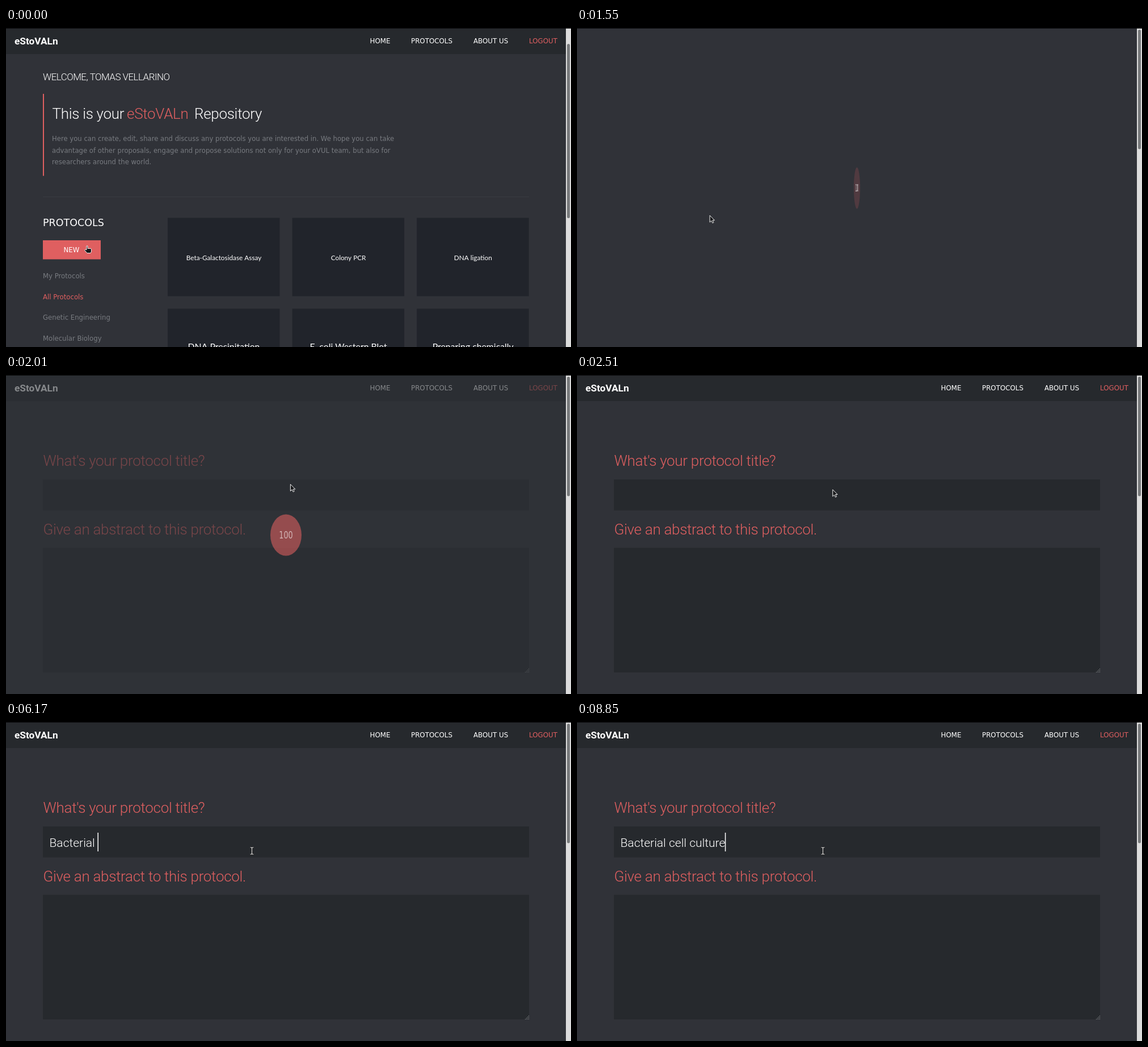
These frames come from a looping animation (996 by 562 pixels, 9710 ms). An HTML page with a canvas:

```html
<!DOCTYPE html>
<html lang="en">
<head>
<meta charset="utf-8">
<style>
  html, body { margin: 0; height: 100%; overflow: hidden; background: #303238; }
  canvas { display: block; }
</style>
</head>
<body>
<canvas id="stage" width="996" height="562"></canvas>
<script>
const ctx = document.getElementById('stage').getContext('2d');
const LOOP = 9710;
const BG = '#303238', DARK = '#26292d', CARD = '#21242b', RED = '#df5f60', GREY = '#787b80';
const UI = '"DejaVu Sans", sans-serif';
const LIGHT = 'Roboto, sans-serif';
const BRAND = 'eStoVALn';

// Time at which the title field takes each value
const typing = [
  [0, ''], [3810, 'B'], [4020, 'Ba'], [4170, 'Bac'], [4410, 'Bact'], [4510, 'Bacte'],
  [4610, 'Bacter'], [4710, 'Bacteri'], [4770, 'Bacteria'], [4920, 'Bacterial'],
  [5110, 'Bacterial '], [5680, 'Bacterial C'], [6170, 'Bacterial '], [6390, 'Bacterial c'],
  [6490, 'Bacterial ce'], [6680, 'Bacterial cel'], [6820, 'Bacterial cell'],
  [7000, 'Bacterial cell '], [7180, 'Bacterial cell C'], [8030, 'Bacterial cell '],
  [8070, 'Bacterial cell c'], [8220, 'Bacterial cell cu'], [8380, 'Bacterial cell cul'],
  [8470, 'Bacterial cell cult'], [8570, 'Bacterial cell cultu'],
  [8700, 'Bacterial cell cultur'], [8850, 'Bacterial cell culture']
];

// Pointer waypoints: time, x, y
const pointerPath = [
  [0, 142, 385], [1150, 144, 385], [1550, 233.5, 330.5], [2010, 501.5, 192.5],
  [2510, 450.8, 201.8], [2860, 433.5, 233], [3070, 433.5, 233], [3110, 433.5, 227]
];

function rect(x, y, w, h, color) {
  ctx.fillStyle = color;
  ctx.fillRect(x, y, w, h);
}

function text(str, x, y, font, color, spacing = 0, align = 'left') {
  ctx.font = font;
  ctx.letterSpacing = spacing + 'px';
  ctx.textAlign = align;
  ctx.fillStyle = color;
  ctx.fillText(str, x, y);
  return ctx.measureText(str).width;
}

const ui = (str, x, y, color, size = 11.7) => text(str, x, y, `${size}px ${UI}`, color);
const heading = (str, x, y, color) => text(str, x, y, `300 26px ${LIGHT}`, color, -0.3);

function navBar() {
  rect(0, 0, 987, 46, DARK);
  text(BRAND, 15, 28.5, `700 17.3px ${LIGHT}`, '#fff');
  ui('HOME', 641.5, 27, '#fff', 11.85);
  ui('PROTOCOLS', 714, 27, '#fff', 11.85);
  ui('ABOUT US', 824, 27, '#fff', 11.85);
  ui('LOGOUT', 922, 27, RED, 11.85);
}

function repositoryPage(t) {
  navBar();
  text('WELCOME, TOMAS VELLARINO', 65, 92, `300 17px ${LIGHT}`, '#fff', -0.55);
  rect(65, 116, 2, 144.5, RED);
  heading('This is your', 81.5, 160, '#fff');
  heading(BRAND, 213, 160, RED);
  heading('Repository', 332, 160, '#fff');
  [
    'Here you can create, edit, share and discuss any protocols you are interested in. We hope you can take',
    'advantage of other proposals, engage and propose solutions not only for your oVUL team, but also for',
    'researchers around the world.'
  ].forEach((line, i) => ui(line, 81, 199 + i * 20.5, GREY, 11.65));
  rect(65, 297, 857, 1, '#383b41');

  ui('PROTOCOLS', 65, 349, '#fff', 17.5);
  rect(65, 374, 102, 33.5, RED);
  ui('NEW', 101.5, 395, '#fff');
  ['My Protocols', 'All Protocols', 'Genetic Engineering', 'Molecular Biology']
    .forEach((item, i) => ui(item, 65, 441 + i * 36.6, i === 1 ? RED : GREY));

  ['Beta-Galactosidase Assay', 'Colony PCR', 'DNA ligation',
   'DNA Precipitation', 'E. coli Western Blot', 'Preparing chemically'].forEach((name, i) => {
    const x = 285 + (i % 3) * 219.6, lower = i > 2;
    rect(x, lower ? 494.5 : 334.5, 197.5, 138, CARD);
    text(name, x + 99, lower ? 567 : 409, `${lower ? 15.8 : 11.8}px Lato, sans-serif`, '#fff', 0, 'center');
  });

  if (t >= 790) {
    rect(0, 544, 237, 18, '#f0f0f0');
    ui(t < 950 ? 'localhost/protocols/new' : 'Waiting for localhost...', 4, 557, '#555', 11);
  }
}

function formPage(t) {
  navBar();
  heading("What's your protocol title?", 65.5, 160, RED);
  rect(65, 184, 857, 54.5, DARK);
  heading('Give an abstract to this protocol.', 65.5, 280.5, RED);
  rect(65, 304.5, 857, 219.5, DARK);
  for (let row = 0; row < 4; row++)
    for (let col = 0; col <= row; col++)
      rect(921 - col * 2, 517 + row * 2, 1, 1, '#8b8d90');

  const value = typing.findLast(([start]) => t >= start)[1];
  if (!value) return;
  const width = text(value, 76.5, 220, `300 21px ${LIGHT}`, '#fff');
  const blinkOff = t >= 7590 && t < 8030;
  if (!blinkOff) rect(76 + width, 195, 1.5, 33, '#fff');
}

function loader(t) {
  const fade = Math.min(1, Math.max(0, (2510 - t) / 860));
  if (!fade) return;
  ctx.save();
  ctx.globalAlpha = fade;
  rect(0, 0, 987, 562, BG);
  if (t > 1518) {
    const turn = (t - 1518) * 0.266 * Math.PI / 180;
    ctx.translate(493.5, 282);
    ctx.scale(Math.abs(Math.sin(turn)), 1);
    ctx.globalAlpha = fade * Math.min(1, (t - 1518) / 180);
    ctx.fillStyle = RED;
    ctx.beginPath();
    ctx.arc(0, 0, 36.5, 0, Math.PI * 2);
    ctx.fill();
    ctx.globalAlpha = fade;
    text('100', 0, 6, `17px ${UI}`, '#fff', 0, 'center');
  }
  ctx.restore();
}

function scrollBar(top, height) {
  rect(987, 0, 9, 562, '#dcdcdc');
  ctx.fillStyle = '#77797b';
  ctx.beginPath();
  ctx.roundRect(989, top, 5, height, 2.5);
  ctx.fill();
  rect(0, 0, 996, 1, '#08090a');
}

const hand = new Path2D('M0-1h2v4.5h5.5l1 1.5v4l-1.5 2.5h-6l-4.5-5 1.5-1.5 2 1z');
const arrow = new Path2D('M0 0v12l2.8-2.6 2 4 2-1-2-3.8h3.6z');
const beam = new Path2D('M-3-6h2l1 1 1-1h2M0-5V5M-3 6h2l1-1 1 1h2');

function pointer(t) {
  const i = pointerPath.findLastIndex(([time]) => t >= time);
  const [t0, x0, y0] = pointerPath[i];
  const [t1, x1, y1] = pointerPath[i + 1] || [LOOP, x0, y0];
  const k = i ? (t - t0) / (t1 - t0) : t < 990 ? 0 : 1;
  ctx.save();
  ctx.translate(x0 + (x1 - x0) * k, y0 + (y1 - y0) * k);
  ctx.lineJoin = 'round';
  if (t >= 2600) {
    for (const [width, color] of [[2.6, '#111'], [1.2, '#e4e4e4']]) {
      ctx.lineWidth = width;
      ctx.strokeStyle = color;
      ctx.stroke(beam);
    }
  } else {
    const shape = t < 1150 ? hand : arrow;
    ctx.lineWidth = 1;
    ctx.fillStyle = '#17181a';
    ctx.strokeStyle = '#f0f0f0';
    ctx.fill(shape);
    ctx.stroke(shape);
  }
  ctx.restore();
}

function draw(now) {
  const t = now % LOOP;
  rect(0, 0, 996, 562, BG);
  if (t < 1150) {
    repositoryPage(t);
    scrollBar(28, 307);
  } else {
    formPage(t);
    loader(t);
    scrollBar(3, 210.5);
  }
  pointer(t);
  requestAnimationFrame(draw);
}
requestAnimationFrame(draw);
</script>
</body>
</html>
```
